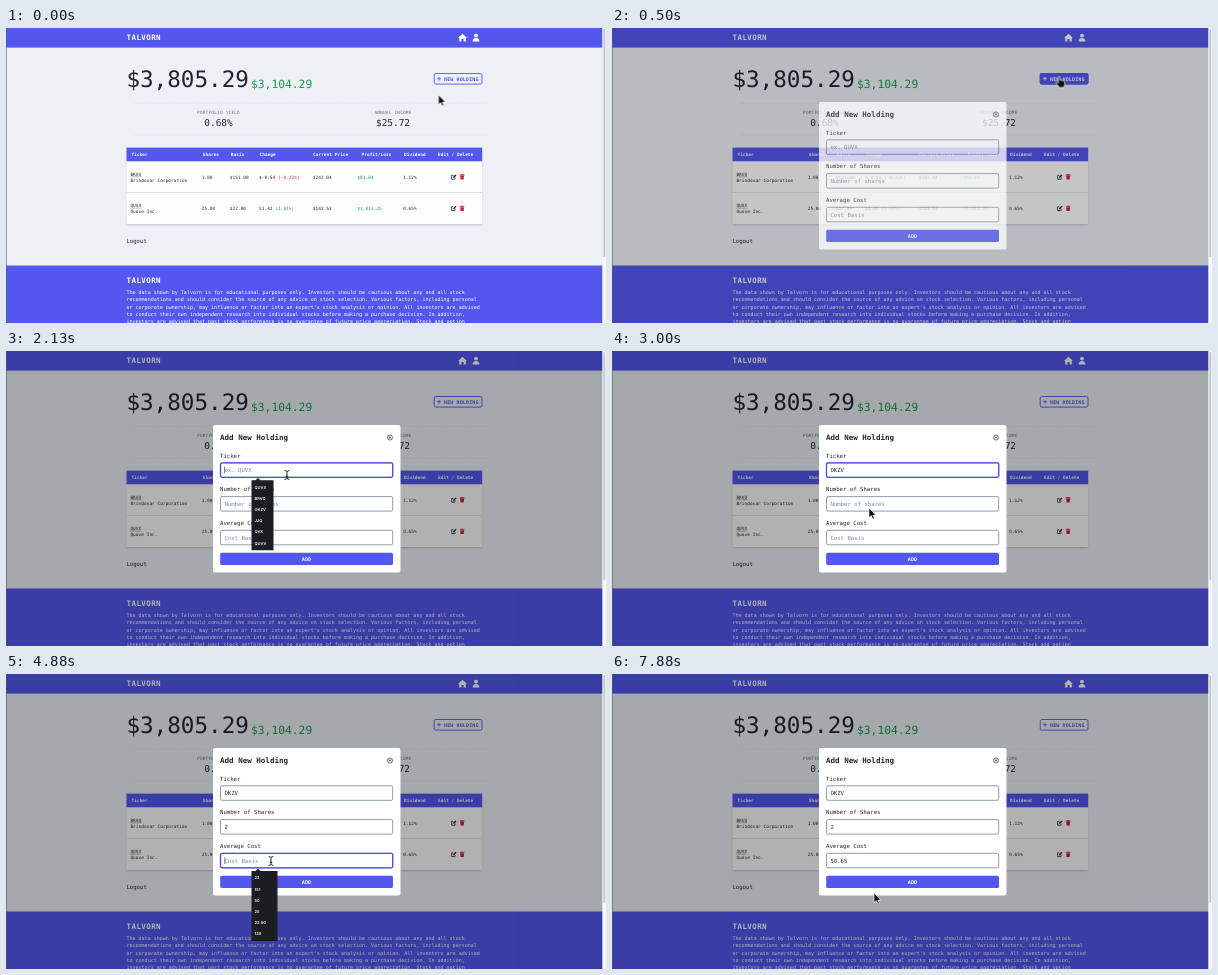
Animation, 600 px wide and 295 px high, one loop 8 s. Source, as an HTML page:

```html
<!DOCTYPE html>
<html lang="en">
<head>
<meta charset="utf-8">
<title>Portfolio</title>
<style>
html, body { margin: 0; width: 100%; height: 100%; overflow: hidden; background: #edf1f6; }
svg { display: block; width: 100vw; height: 100vh; }
text { font-family: "DejaVu Sans Mono", monospace; fill: #22252e; text-rendering: geometricPrecision; white-space: pre; }
.b { font-weight: 700; }
.mid { text-anchor: middle; }
.xs { font-size: 4.42px; letter-spacing: .06px; }
.sm { font-size: 5.03px; }
.md { font-size: 5.66px; }
.lg { font-size: 7.54px; }
.xl { font-size: 9.43px; }
.brand { letter-spacing: .05em; }
.wide { letter-spacing: .025em; }
.white { fill: #fff; }
.gray { fill: #6a707c; }
.hint { fill: #858b96; }
.up { fill: #1c9b50; }
.down { fill: #cf2f3c; }
.ink { fill: #5457ee; }
.list text, .tip { font: 600 4px Inter, sans-serif; }
.list text { fill: #fff; }
.box { fill: #fff; stroke: #77839a; stroke-width: .8; }
.ring { fill: none; stroke: #4a4de0; stroke-width: 1.3; }
.dash { stroke: #cfd5dd; stroke-width: .6; stroke-dasharray: 1.2 1.2; }

/* 64 poses per loop, each 1.5625% */
.k, .cursor, .typed, .mark { animation: 8s step-end infinite both; }
.cursor { animation-name: path; }
.typed { animation-name: type; }
.mark { animation-name: mark; }

@keyframes fade { 0% { opacity: 0 } 4.6875% { opacity: .3 } 6.25% { opacity: .75 } 7.8125%, to { opacity: 1 } }
@keyframes hover { 0% { opacity: 0 } 3.125% { opacity: .6 } 4.6875% { opacity: 1 } 7.8125% { opacity: .35 } 9.375%, to { opacity: 0 } }

@keyframes tickFocus { 0%, 40.625%, to { opacity: 0 } 23.4375% { opacity: 1 } }
@keyframes tickCaret { 0%, 35.9375%, to { opacity: 0 } 23.4375% { opacity: 1 } }
@keyframes tickList { 0%, 37.5%, to { opacity: 0 } 23.4375% { opacity: 1 } }
@keyframes tickHint { 0% { opacity: 1 } 35.9375%, to { opacity: 0 } }
@keyframes tickTry { 0%, 37.5%, to { opacity: 0 } 35.9375% { opacity: 1 } }
@keyframes tickSet { 0% { opacity: 0 } 37.5%, to { opacity: 1 } }

@keyframes shareFocus { 0%, 59.375%, to { opacity: 0 } 40.625% { opacity: 1 } }
@keyframes shareList { 0%, 53.125%, to { opacity: 0 } 42.1875% { opacity: 1 } }
@keyframes shareHint { 0% { opacity: 1 } 48.4375%, to { opacity: 0 } }
@keyframes shareTry { 0%, 53.125%, to { opacity: 0 } 48.4375% { opacity: 1 } }
@keyframes try1 { 0%, 50%, to { opacity: 0 } 48.4375% { opacity: 1 } }
@keyframes try2 { 0%, 51.5625%, to { opacity: 0 } 50% { opacity: 1 } }
@keyframes try3 { 0%, 53.125%, to { opacity: 0 } 51.5625% { opacity: 1 } }
@keyframes shareSet { 0% { opacity: 0 } 53.125%, to { opacity: 1 } }
@keyframes mark {
  0% { transform: none } 50% { transform: translateY(11.2px) } 51.5625%, to { transform: translateY(22.4px) }
}

@keyframes costFocus { 0%, 89.0625%, to { opacity: 0 } 59.375% { opacity: 1 } }
@keyframes costList { 0%, 68.75%, to { opacity: 0 } 59.375% { opacity: 1 } }
@keyframes costHint { 0% { opacity: 1 } 65.625%, to { opacity: 0 } }
@keyframes type {
  0% { transform: none }
  65.625% { transform: translateX(3.41px) }
  68.75% { transform: translateX(6.82px) }
  73.4375% { transform: translateX(10.23px) }
  79.6875% { transform: translateX(13.64px) }
  82.8125%, to { transform: translateX(17.05px) }
}

@keyframes path {
  0% { transform: translate(432.5px, 67px) }
  1.5625% { transform: translate(440px, 60px) }
  3.125% { transform: translate(446px, 52px) }
  4.6875% { transform: translate(447.3px, 48.5px) }
  7.8125% { transform: translate(384.5px, 97px) }
  9.375% { transform: translate(368px, 125px) }
  10.9375% { transform: translate(357px, 148px) }
  18.75% { transform: translate(330px, 130px) }
  20.3125% { transform: translate(290px, 122px) }
  23.4375% { transform: translate(281px, 124px) }
  32.8125% { transform: translate(272px, 126px) }
  34.375% { transform: translate(262px, 148px) }
  35.9375% { transform: translate(257px, 157px) }
  39.0625% { transform: translate(270px, 152px) }
  40.625% { transform: translate(275px, 153px) }
  48.4375% { transform: translate(264.5px, 184px) }
  50% { transform: translate(262px, 193px) }
  51.5625% { transform: translate(258px, 203px) }
  54.6875% { transform: translate(262px, 194px) }
  56.25% { transform: translate(265px, 187px) }
  85.9375% { transform: translate(268px, 236px) }
  89.0625% { transform: translate(265px, 230px) }
  95.3125% { transform: translate(263px, 223px) }
  98.4375%, to { transform: translate(262px, 219px) }
}
@keyframes arrow {
  0%, 7.8125%, 34.375%, 48.4375%, 85.9375%, to { opacity: 1 }
  3.125%, 18.75%, 39.0625%, 56.25% { opacity: 0 }
}
@keyframes hand { 0%, 7.8125%, to { opacity: 0 } 3.125% { opacity: 1 } }
@keyframes beam {
  0%, 34.375%, 48.4375%, 65.625%, to { opacity: 0 }
  18.75%, 39.0625%, 56.25% { opacity: 1 }
}
</style>
</head>
<body>
<svg viewBox="0 0 600 295" preserveAspectRatio="none">
  <defs>
    <filter id="soft" x="-10%" y="-10%" width="120%" height="125%"><feGaussianBlur stdDeviation="1.3"/></filter>
    <g id="tools">
      <path d="M449 149.4V151.2H445.6V147.4H447.4" fill="none" stroke="#22252e" stroke-width=".8"/>
      <path d="M447 150l.3-1.4 2.2-2.2 1 1-2.2 2.2z" fill="#22252e"/>
      <path d="M453.8 146.6h1.4l.4-.6h1l.4.6h1.4v.8h-4.600zM454.200 147.800h3.800l-.3 3.800h-3.200z" fill="#d21f35"/>
    </g>
  </defs>

  <rect width="600" height="295" fill="#edf1f6"/>

  <!-- top bar -->
  <rect width="596.5" height="19.6" class="ink"/>
  <text x="120.6" y="12.3" class="lg b brand white">TALVORN</text>
  <g fill="#fff">
    <path d="M452 9.900L456.500 5.700 461 9.900H459.800V13.500H457.600V10.900H455.400V13.500H453.200V9.900Z"/>
    <circle cx="470" cy="7.600" r="1.950"/>
    <path d="M466.600 13.400c0-4.600 6.800-4.600 6.800 0z"/>
  </g>

  <!-- totals -->
  <text x="120.4" y="59.2" font-size="22.62">$3,805.29</text>
  <text x="245" y="59.6" font-size="11.31" class="up">$3,104.29</text>
  <rect x="428.2" y="45.5" width="47.800" height="10.600" rx="1.600" fill="none" stroke="#5457ee" stroke-width=".9"/>
  <path d="M431 50.700h4M433 48.700v4" stroke="#5457ee" stroke-width=".8"/>
  <text x="438" y="52.600" class="sm b wide ink">NEW HOLDING</text>
  <g class="k" style="animation-name:hover">
    <rect x="427.800" y="45.100" width="48.600" height="11.400" rx="1.800" class="ink"/>
    <path d="M431 50.700h4M433 48.700v4" stroke="#fff" stroke-width=".8"/>
    <text x="438" y="52.600" class="sm b wide white">NEW HOLDING</text>
  </g>

  <path d="M128 75.200H482M128 106.900H482" class="dash"/>
  <g class="mid">
    <text x="212.500" y="86.400" class="gray" font-size="4.4" letter-spacing=".22">PORTFOLIO YIELD</text>
    <text x="212.500" y="97.700" class="xl">0.68%</text>
    <text x="387" y="86.400" class="gray" font-size="4.4" letter-spacing=".22">ANNUAL INCOME</text>
    <text x="387" y="97.700" class="xl">$25.72</text>
  </g>

  <!-- holdings -->
  <rect x="120.800" y="134" width="355" height="63" fill="#b9c0cb" filter="url(#soft)"/>
  <rect x="120.500" y="133" width="355.700" height="63" fill="#fdfdfe"/>
  <rect x="120.500" y="164.200" width="355.700" height=".8" fill="#d9dee5"/>
  <rect x="120.500" y="119.600" width="355.700" height="13.700" class="ink"/>
  <g class="xs b">
    <text class="white" y="128.300"><tspan x="125.500">Ticker</tspan><tspan x="196.800">Shares</tspan><tspan x="224.800">Basis</tspan><tspan x="253.500">Change</tspan><tspan x="307">Current Price</tspan><tspan x="355.500">Profit/Loss</tspan><tspan x="398">Dividend</tspan><tspan x="432">Edit / Delete</tspan></text>
  </g>
  <g class="xs">
    <text x="124.400" y="147.700">BRVQ</text>
    <text x="124.400" y="153.800">Brindovar Corporation</text>
    <text y="150.500"><tspan x="195.700">1.00</tspan><tspan x="223.800">$151.00</tspan><tspan x="253">$-0.54 </tspan><tspan class="down">(-0.22%)</tspan><tspan x="306.800">$242.04</tspan><tspan x="351.400" class="up">$91.04</tspan><tspan x="397.200">1.12%</tspan></text>
    <text x="124.400" y="179">QUVX</text>
    <text x="124.400" y="185.100">Quove Inc.</text>
    <text y="181.900"><tspan x="195.700">25.00</tspan><tspan x="223.800">$22.00</tspan><tspan x="253">$1.42 </tspan><tspan class="up">(1.01%)</tspan><tspan x="306.800">$142.53</tspan><tspan x="351.400" class="up">$3,013.25</tspan><tspan x="397.200">0.65%</tspan></text>
  </g>
  <path d="M124.500 148.800h10.600M124.500 180.100h10.600" stroke="#22252e" stroke-width=".5" stroke-dasharray=".8 .5"/>
  <use href="#tools"/>
  <use href="#tools" y="31.400"/>
  <text x="120.400" y="215" class="md">Logout</text>

  <!-- footer -->
  <rect y="237.500" width="596.500" height="57.500" class="ink"/>
  <text x="120.600" y="254.800" class="lg b brand white">TALVORN</text>
  <text class="sm white" y="265.700"><tspan x="120.500">The data shown by Talvorn is for educational purposes only. Investors should be cautious about any and all stock</tspan><tspan x="120.500" dy="7.400">recommendations and should consider the source of any advice on stock selection. Various factors, including personal</tspan><tspan x="120.500" dy="7.400">or corporate ownership, may influence or factor into an expert's stock analysis or opinion. All investors are advised</tspan><tspan x="120.500" dy="7.400">to conduct their own independent research into individual stocks before making a purchase decision. In addition,</tspan><tspan x="120.500" dy="7.400">investors are advised that past stock performance is no guarantee of future price appreciation. Stock and option</tspan></text>

  <!-- dialog -->
  <rect width="596.500" height="295" fill-opacity=".3" class="k" style="animation-name:fade"/>
  <rect x="596.500" width="3.500" height="295" fill="#f6f7f9"/>
  <rect x="597.400" y="1" width="1.800" height="228" rx=".9" fill="#c3c5c9"/>
  <rect width=".6" height="295" fill="#555a66"/>

  <g class="k" style="animation-name:fade">
    <rect x="207" y="74" width="187.500" height="147.600" rx="2" fill="#fff"/>
    <text x="214" y="89.200" class="lg b">Add New Holding</text>
    <g fill="none" stroke="#22252e" stroke-width=".6">
      <circle cx="384" cy="86.500" r="2.600"/>
      <path d="M382.900 85.400l2.200 2.200m0-2.200l-2.200 2.200" stroke-width=".8"/>
    </g>
    <g class="md">
      <text x="214" y="106.600">Ticker</text>
      <text x="214" y="140.400">Number of Shares</text>
      <text x="214" y="174.200">Average Cost</text>
    </g>
    <rect x="214.500" y="111.800" width="172.200" height="14.500" rx="1.500" class="box"/>
    <rect x="214.500" y="145.600" width="172.200" height="14.500" rx="1.500" class="box"/>
    <rect x="214.500" y="179.300" width="172.200" height="14.500" rx="1.500" class="box"/>
    <rect x="214.200" y="201.700" width="172.800" height="12.300" rx="1.600" class="ink"/>
    <text x="300.500" y="209.700" class="sm b wide white mid">ADD</text>

    <g class="md">
      <text x="218.400" y="121" class="hint k" style="animation-name:tickHint">ex. QUVX</text>
      <text x="218.400" y="121" class="k" style="animation-name:tickSet">OKZV</text>
      <text x="218.400" y="154.800" class="hint k" style="animation-name:shareHint">Number of shares</text>
      <text x="218.400" y="154.800" class="k" style="animation-name:shareSet">2</text>
      <text x="218.400" y="188.600">50.65</text>
      <g class="typed">
        <rect x="218.400" y="182" width="20" height="9" fill="#fff"/>
        <path d="M218.800 183.200v6.800" stroke="#22252e" stroke-width=".6" class="k" style="animation-name:costFocus"/>
      </g>
      <text x="218.400" y="188.600" class="hint k" style="animation-name:costHint">Cost Basis</text>
    </g>
    <path d="M218.600 115.600v6.800" stroke="#22252e" stroke-width=".6" class="k" style="animation-name:tickCaret"/>

    <g class="k" style="animation-name:tickTry">
      <rect x="214.800" y="112.100" width="171.600" height="13.900" rx="1.300" fill="#e8edfc"/>
      <text x="218.500" y="120.500" class="tip">OKZV</text>
    </g>
    <g class="k" style="animation-name:shareTry">
      <rect x="214.800" y="145.900" width="171.600" height="13.900" rx="1.300" fill="#e8edfc"/>
      <text x="218.500" y="154.300" class="tip k" style="animation-name:try1">2.23</text>
      <text x="218.500" y="154.300" class="tip k" style="animation-name:try2">20</text>
      <text x="218.500" y="154.300" class="tip k" style="animation-name:try3">2</text>
    </g>

    <rect x="214.500" y="111.800" width="172.200" height="14.500" rx="1.500" class="ring k" style="animation-name:tickFocus"/>
    <rect x="214.500" y="145.600" width="172.200" height="14.500" rx="1.500" class="ring k" style="animation-name:shareFocus"/>
    <rect x="214.500" y="179.300" width="172.200" height="14.500" rx="1.500" class="ring k" style="animation-name:costFocus"/>
  </g>

  <!-- suggestions -->
  <g class="list k" style="animation-name:tickList">
    <path d="M245.500 129.300h4l2.500-2.300 2.500 2.300h13v70h-22z" fill="#1c1d22"/>
    <rect x="245.500" y="153.200" width="22" height="11.200" fill="#3b3c42" class="k" style="animation-name:tickTry"/>
    <text y="137.600"><tspan x="248.500">QUVX</tspan><tspan x="248.500" dy="11.200">BRVQ</tspan><tspan x="248.500" dy="11.200">OKZV</tspan><tspan x="248.500" dy="11.200">JJQ</tspan><tspan x="248.500" dy="11.200">QVX</tspan><tspan x="248.500" dy="11.200">QUVV</tspan></text>
  </g>
  <g class="list k" style="animation-name:shareList">
    <path d="M245.500 163.200h4l2.500-2.300 2.500 2.300h17v70h-26z" fill="#1c1d22"/>
    <g class="k" style="animation-name:shareTry"><rect x="245.500" y="175.900" width="26" height="11.200" fill="#3b3c42" class="mark"/></g>
    <text y="171.500"><tspan x="248.500">25</tspan><tspan x="248.500" dy="11.200">2.23</tspan><tspan x="248.500" dy="11.200">20</tspan><tspan x="248.500" dy="11.200">2</tspan><tspan x="248.500" dy="11.200">25.22</tspan><tspan x="248.500" dy="11.200">2.22055</tspan></text>
  </g>
  <g class="list k" style="animation-name:costList">
    <path d="M245.500 197h4l2.500-2.300 2.500 2.300h17v70h-26z" fill="#1c1d22"/>
    <text y="205.300"><tspan x="248.500">22</tspan><tspan x="248.500" dy="11.200">151</tspan><tspan x="248.500" dy="11.200">50</tspan><tspan x="248.500" dy="11.200">25</tspan><tspan x="248.500" dy="11.200">22.50</tspan><tspan x="248.500" dy="11.200">120</tspan></text>
  </g>

  <!-- pointer -->
  <g class="cursor">
    <path d="M0 0V9.600L2.300 7.600 3.800 11 5.400 10.300 3.900 7.100H6.800Z" fill="#0b0b0d" stroke="#fff" stroke-width=".6" class="k" style="animation-name:arrow"/>
    <path d="M-1 .8C-1-.4.8-.4.8.8V4C1.200 3.200 2.400 3.400 2.500 4.200 3.100 3.700 4 4 4.100 4.700 4.800 4.400 5.500 4.800 5.500 5.600V8C5.500 9 4.600 9.700 4.500 11H-.3C-.6 9.300-2.800 7.700-3.300 6.200-3.500 5.400-2.400 5-1.800 5.700L-1 6.600Z" fill="#0b0b0d" stroke="#fff" stroke-width=".7" class="k" style="animation-name:hand"/>
    <g class="k" style="animation-name:beam" fill="none" stroke="#16171b" stroke-width=".9">
      <path d="M-2.400-4.400Q0-4.400 0-3.200 0-4.400 2.400-4.400M0-3.200V3.200M-2.400 4.400Q0 4.400 0 3.200 0 4.400 2.400 4.400M-1.300 1.400H1.300"/>
    </g>
  </g>
</svg>
</body>
</html>
```
